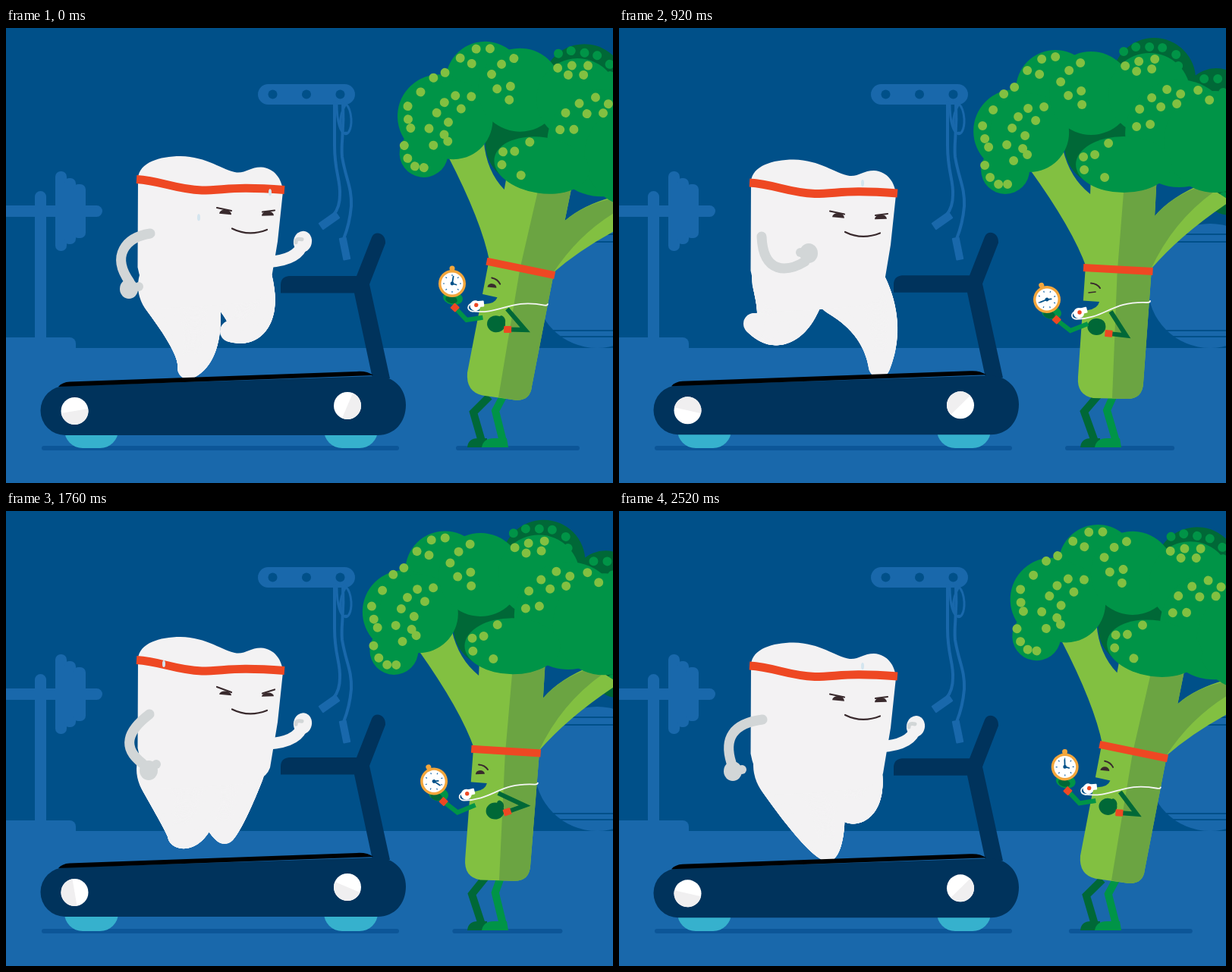
Write an HTML page with a canvas that moves like this. It is 800 px wide and 600 px high and loops after 2560 ms.

```html
<!DOCTYPE html>
<html lang="en">
<head>
<meta charset="utf-8">
<title>Treadmill</title>
<style>
html, body { margin: 0; width: 100%; height: 100%; overflow: hidden; background: #005089; }
canvas { display: block; }
</style>
</head>
<body>
<canvas id="stage" width="800" height="600"></canvas>
<script>
const ctx = document.getElementById('stage').getContext('2d');
const LOOP = 2560, STRIDE = 640, STEP = 40, TAU = Math.PI * 2;
const WALL = '#005089', FLOOR = '#1968ab', NAVY = '#00335c', TOOTH = '#f3f2f3', GREY = '#d2d6d7',
  RED = '#ee4823', INK = '#392a2d', LIGHT = '#82c041', SHADE = '#6ba442', GREEN = '#009447', DARK = '#006837';

// Drawing helpers
function fill(d, color) { ctx.fillStyle = color; ctx.fill(new Path2D(d)); }
function stroke(d, color, width, cap = 'round') {
  ctx.strokeStyle = color;
  ctx.lineWidth = width;
  ctx.lineCap = cap;
  ctx.lineJoin = cap === 'round' ? 'round' : 'miter';
  ctx.stroke(new Path2D(d));
}
function oval(x, y, rx, ry, color, turn = 0, from = 0, to = TAU) {
  ctx.fillStyle = color;
  ctx.beginPath();
  ctx.ellipse(x, y, rx, ry, turn, from, to);
  ctx.fill();
}
const disc = (x, y, r, color) => oval(x, y, r, r, color);
function box(x, y, w, h, r, color) {
  ctx.fillStyle = color;
  ctx.beginPath();
  ctx.roundRect(x, y, w, h, r);
  ctx.fill();
}
function at(x, y, turn, draw) {
  ctx.save();
  ctx.translate(x, y);
  ctx.rotate(turn);
  draw();
  ctx.restore();
}
function dots(list, r, color) {
  for (let i = 0; i < list.length; i += 2) disc(list[i], list[i + 1], r, color);
}

// Motion helpers
const mix = (a, b, k) => a + (b - a) * k;
const smooth = k => k * k * (3 - 2 * k);
function keyed(keys, t, period) {
  t %= period;
  let i = keys.length - 1;
  while (keys[i][0] > t) i--;
  const a = keys[i], b = keys[(i + 1) % keys.length];
  const end = i + 1 < keys.length ? b[0] : period;
  const k = (t - a[0]) / (end - a[0]);
  return a.slice(1).map((v, j) => mix(v, b[j + 1], k));
}

// Legs: time, hip x y radius, bend x y, foot x y radius
const LEG_A = [
  [0, 226, 340, 52, 262, 420, 240, 449, 14],
  [200, 218, 330, 44, 215, 395, 139, 406, 16],
  [280, 225, 330, 50, 225, 410, 178, 390, 14],
  [480, 290, 335, 52, 285, 400, 288, 425, 14],
  [600, 235, 335, 58, 270, 425, 275, 450, 12]
];
const LEG_B = [
  [0, 305, 330, 45, 340, 395, 296, 400, 14],
  [200, 300, 335, 45, 325, 385, 386, 429, 16],
  [280, 300, 335, 48, 350, 385, 343, 447, 14],
  [480, 228, 340, 56, 250, 420, 228, 428, 15],
  [600, 300, 335, 45, 325, 385, 305, 395, 17]
];
// Near arm: time, curve points, hand, thumb
const ARM = [
  [0, 190, 271, 158, 276, 138, 300, 163, 335, 162, 344, 175, 341],
  [200, 188, 274, 190, 325, 222, 322, 245, 308, 250, 297, 239, 296],
  [280, 188, 275, 190, 325, 222, 322, 245, 308, 250, 297, 239, 296],
  [480, 189, 268, 160, 290, 152, 312, 180, 333, 188, 342, 198, 334],
  [600, 189, 275, 150, 280, 138, 300, 148, 332, 150, 343, 162, 341]
];
const FAR_ARM = [[0, 0], [200, -80], [280, -80], [480, 0], [600, 0]];
const BOUNCE = [[0, -4.5], [100, -7.5], [200, -1.5], [280, 0], [360, -4.5], [480, -7.5], [560, -1.5], [600, 0]];
const DIP = [[0, 2], [120, 0], [200, 0], [280, 1.3]];
const BOB = [[0, 2], [480, 1], [920, 0], [1480, -1], [1760, -1.5], [2200, 6], [2480, 2.3]];
// Sweat: x, y, start time
const DROPS = [[254, 249, 2540], [348, 216, 2540], [208, 202, 440], [222, 215, 440], [321, 203, 880],
  [254, 254, 1440], [350, 221, 1440], [208, 200, 1720], [221, 224, 2160], [321, 203, 2480]];

function background() {
  ctx.fillStyle = WALL;
  ctx.fillRect(0, 0, 800, 600);
  disc(779, 340, 82, FLOOR);
  stroke('M728 272H830M720 282H838M700 399H850M705 407H850', WALL, 2, 'butt');
  ctx.fillStyle = FLOOR;
  ctx.fillRect(0, 422, 800, 178);
  // Barbell and stand
  box(-10, 234, 137, 15, 7.5, FLOOR);
  box(65, 189, 15, 105, 7, FLOOR);
  box(76, 198, 16, 87, 7, FLOOR);
  box(88, 206, 17, 71, 7, FLOOR);
  box(38, 215, 15, 200, 7.5, FLOOR);
  box(-10, 408, 102, 15, [0, 8, 0, 0], FLOOR);
  // Rack with a skipping rope
  box(332, 74, 128, 27, 13.5, FLOOR);
  dots([351.5, 87.5, 396, 87.5, 440.5, 87.5], 6, WALL);
  stroke('M433 98V155C433 190 441 200 440 220Q440 236 432 246', FLOOR, 4);
  stroke('M444 98C446 140 441 150 443 170C448 200 456 210 455 235Q453 258 445 278', FLOOR, 4);
  stroke('M436 100C436 150 456 148 455 120Q454 106 448 100M448 100C437 118 439 142 448 138', FLOOR, 3);
  at(426, 254, -0.61, () => box(-14, -5.5, 28, 11, 1, FLOOR));
  at(446.5, 291, -0.2, () => box(-5, -15, 10, 30, 1, FLOOR));
  stroke('M50 554H515', '#0c5698', 6);
}

function leg([hx, hy, hr, bx, by, fx, fy, fr]) {
  for (let i = 0; i <= 60; i++) {
    const k = i / 60, a = (1 - k) ** 2, b = 2 * k * (1 - k), c = k * k;
    disc(a * hx + b * bx + c * fx, a * hy + b * by + c * fy, mix(hr, fr, k), TOOTH);
  }
}

function face(y) {
  const lift = y < -6 ? 2 : 0;
  oval(289, 250, 8, 6 - lift / 2, INK, 0.08, Math.PI, TAU);
  oval(345, 252, 8, 6 - lift / 2, INK, -0.03, Math.PI, TAU);
  stroke(`M278 ${241.5 - lift}L297 ${245.5 + lift / 2}M338 ${247 + lift / 2}L354 ${245 - lift}`, INK, 2.2);
  stroke('M298 269Q320 280 344 270.5', INK, 2.2);
}

function tooth(t) {
  const [y] = keyed(BOUNCE, t, STRIDE);
  const [reach] = keyed(FAR_ARM, t, STRIDE);
  at(reach, y / 2, 0, () => {
    stroke('M345 311Q386 308 391 286', TOOTH, 15);
    oval(391, 284, 12, 14, TOOTH, 0.2);
    stroke('M382 285Q382 279 390 281', GREY, 5);
  });
  leg(keyed(LEG_A, t, STRIDE));
  leg(keyed(LEG_B, t, STRIDE));
  at(0, y, 0, () => {
    fill('M174 202C176 182 202 173.5 230 173.5C265 174 285 192 304 195C316 196 322 188 336 188' +
      'C354 189 364 204 365 220L358 286L348 346Q340 368 300 368L255 372L205 374Q180 355 173.5 320Z', TOOTH);
    stroke('M172 204C205 206 222 217 258 218.5C292 218 300 213 367 218', RED, 11, 'butt');
    face(y);
  });
  const a = keyed(ARM, t, STRIDE);
  stroke(`M${a[0]} ${a[1]}C${a.slice(2, 8).join(' ')}`, GREY, 13);
  oval(a[8], a[9], 12, 13, GREY);
  disc(a[10], a[11], 6, GREY);
  for (const [x, dy, start] of DROPS) {
    const age = (t - start + LOOP) % LOOP;
    if (age < 80) oval(x, dy + age * 0.04, 2, 4.5, '#d3e5ef');
  }
}

function treadmill(t) {
  const [dip] = keyed(DIP, t, 320);
  for (const x of [77, 419]) box(x, 525, 71, 29, [0, 0, 24, 24], '#36b1cd');
  at(0, dip - 2, 0, () => {
    fill('M373 327H462L482 276C486 266 501 270 500 284L479 338L506 462H483L459 349.5H362V339Q362 328 373 327Z', NAVY);
    fill('M78 472L488 459C512 459 527 476 527 497C527 520 512 537 490 537H78A32.5 32.5 0 0 1 78 472Z', NAVY);
    fill('M69 473Q74 467 84 466.5L462 453Q476 452 484 458Z', '#000');
    const turn = 1.4 - t / STRIDE * TAU;
    for (const [x, y, shift] of [[90.5, 505, 0], [450, 498, 1]]) {
      disc(x, y, 18, '#fff');
      oval(x, y, 18, 18, '#f0eff0', turn - shift, -Math.PI / 2, Math.PI / 2);
    }
  });
}

const BUDS_LEFT = [557, 41, 575, 38, 538, 56, 554, 61, 608, 46, 593, 56, 582, 71, 592, 89, 609, 83, 610, 101,
  521, 78, 507, 87, 493, 108, 539, 106, 560, 104, 526, 117, 549, 122, 479, 129, 518, 132, 535, 142,
  482, 146, 487, 157, 511, 154, 532, 159, 538, 167, 520, 175, 482, 181, 489, 197, 500, 206, 512, 206];
const BUDS_RIGHT = [667, 50, 685, 44, 706, 41, 682, 57, 702, 54, 722, 81, 740, 87, 702, 92, 686, 107, 714, 104,
  735, 100, 763, 82, 778, 95, 682, 130, 700, 127, 645, 152, 627, 167, 612, 170, 613, 187, 640, 197];
const BUDS_BACK = [665, 31, 681, 25, 699, 25, 716, 26, 734, 35, 737, 50, 771, 67, 789, 67, 796, 85, 790, 208, 797, 222];

function lean(t) {
  if (t < 800) return 1 - smooth(t / 800);
  if (t < 1760) return 0.06 * smooth((t - 800) / 960);
  return mix(0.06, 1, smooth((t - 1760) / 800));
}

function crown() {
  disc(705, 68, 55, DARK);
  disc(787, 97, 44, DARK);
  disc(806, 205, 42, DARK);
  disc(640, 155, 53, DARK);
  dots(BUDS_BACK, 6, GREEN);
  fill('M541 186L585 160Q594 198 621 219L622 190H709L706 248Q728 222 770 205L806 228Q740 272 701 318L616 316Q598 265 541 186Z', LIGHT);
  fill('M667 190H709L706 248Q728 222 768 208L784 216Q730 255 701 318H657Z', SHADE);
  for (const [x, y, r] of [[575, 81, 52], [522, 136, 55], [509, 187, 32], [541, 138, 52], [622, 86, 55],
    [699, 87, 54], [738, 139, 71], [785, 150, 67]]) disc(x, y, r, GREEN);
  oval(665, 180, 63, 37, GREEN);
  dots(BUDS_LEFT, 6, LIGHT);
  dots(BUDS_RIGHT, 6, LIGHT);
}

function stopwatch(x, y, turn, t) {
  at(x, y, turn, () => {
    box(-2.5, -19, 5, 6, 0, '#f3a63c');
    disc(0, -20, 3.5, '#f3a63c');
    disc(0, 0, 18, '#f3a63c');
    disc(0, 0, 14.5, '#fff');
    for (let i = 0; i < 8; i++) {
      const a = i * TAU / 8, c = Math.cos(a), s = Math.sin(a);
      stroke(`M${c * 10} ${s * 10}L${c * 12} ${s * 12}`, FLOOR, 1.2, 'butt');
    }
    const hand = t / 1280 * TAU - 1.4;
    stroke(`M0 0L${9.5 * Math.cos(hand)} ${9.5 * Math.sin(hand)}M0 0L5.5 1.5`, WALL, 1.8);
    disc(0, 0, 2.4, WALL);
  });
}

function broccoli(t) {
  const p = lean(t), turn = p * 8.5 * Math.PI / 180;
  const [bob] = keyed(BOB, t, LOOP);
  const cos = Math.cos(turn), sin = Math.sin(turn);
  const put = (x, y) => {
    const dx = x - 692, dy = y - 455;
    return [692 + dx * cos - dy * sin, 455 + dx * sin + dy * cos + bob];
  };
  const swayed = draw => at(692, 455 + bob, turn, () => { ctx.translate(-692, -455); draw(); });

  stroke(`M${591 + 5 * p} 554H${729 + 24 * p}`, '#0c5698', 6);
  // Legs
  const hipY = 484 + bob, kneeY = 506 + bob / 2;
  stroke(`M${632 + 5 * p} ${hipY}L${613 + 4 * p - bob / 2} ${kneeY}L627 545`, DARK, 10, 'butt');
  fill('M608 553Q609 541 622 541H634V553Z', DARK);
  stroke(`M${652 + 3 * p} ${hipY}L${643 + 4 * p - bob} ${kneeY - 2}L655 545`, GREEN, 10, 'butt');
  fill('M627 553Q629 541 643 541H660L662 553Z', GREEN);

  // Trunk: the top follows the sway, the bottom stays near the feet
  const low = (x, y, dx, dy) => [x + dx * p, y + dy * p + bob * 0.8];
  const bottomRight = `${low(691, 468, 2, 3)}Q${low(690, 490, 1, 1)} ${low(668, 489, 2, 0)}`;
  fill(`M${put(615, 312)}L${low(605, 460, 3, -7)}Q${low(603, 484, 3, -6)} ${low(625, 488, 3, -5)}` +
    `L${low(668, 489, 2, 0)}Q${low(690, 490, 1, 1)} ${low(691, 468, 2, 3)}L${put(702, 316)}Z`, LIGHT);
  fill(`M${put(657, 312)}L${low(650, 488.5, -1, -3)}L${low(668, 489, 2, 0)}L${bottomRight}` +
    `L${low(691, 468, 2, 3)}L${put(702, 316)}Z`, SHADE);

  swayed(() => {
    crown();
    stroke('M612 316L703.5 321', RED, 10, 'butt');
    fill('M604 359L633 361Q631 370 618 372L604 373Z', WALL);
    if (t > 840 && t < 1000) stroke('M619 349L628 348', INK, 1.6);
    else oval(624, 349, 6, 5, INK, -0.05, Math.PI, TAU);
    stroke('M622 336.5Q630 337 634 343', INK, 2);
    stroke('M604 384C592 384 597 371 606 374M602 384C642 383 648 360 696 362Q700 362 700 360', '#f4f5f4', 1.8);
    at(611, 373, -0.25, () => box(-5, -4, 11, 8, 1, '#fff'));
    disc(606, 376, 7, '#fff');
    disc(607, 375, 2.7, RED);

    const k = 0.5 + 0.5 * Math.cos((t - 340) / 1280 * TAU);
    const wx = mix(645, 662, k), wy = mix(403, 398, k);
    stroke(`M648 374L${mix(668, 685, k)} ${mix(406, 388, k)}L${wx} ${wy}`, DARK, 6, 'butt');
    oval(wx - 16, wy - mix(9, 0, k), 12, 11, DARK);
    oval(wx - 9, wy - 13 + 4 * k, 4, 6, DARK, -0.5);
    at(wx, wy, mix(0.1, -0.4, k), () => box(-5, -4.5, 10, 9, 1, RED));
  });

  // Arm holding the stopwatch
  const e = p ** 2, dx = 24 * e, dy = -23 * e + bob;
  const wrist = [577 + 15 * e, 385 - 18 * e + bob];
  stroke(`M${put(618, 390)}L${595 + 12 * e} ${399 - 16 * e + bob}L${wrist}`, GREEN, 6, 'butt');
  oval(570 + 19 * e, 375 - 21 * e + bob, 13, 9, GREEN, 0.2);
  oval(567 + 20 * e, 378 - 22 * e + bob, 8, 5, DARK, 0.3);
  at(wrist[0], wrist[1], 0.75, () => box(-5, -4.5, 9, 9, 1, RED));
  stopwatch(564 + dx, 358 + dy, -0.37 * (1 - p ** 3), t);
}

function frame(now) {
  const t = Math.floor((now % LOOP) / STEP) * STEP;
  background();
  tooth(t);
  treadmill(t);
  broccoli(t);
  requestAnimationFrame(frame);
}
requestAnimationFrame(frame);
</script>
</body>
</html>
```
